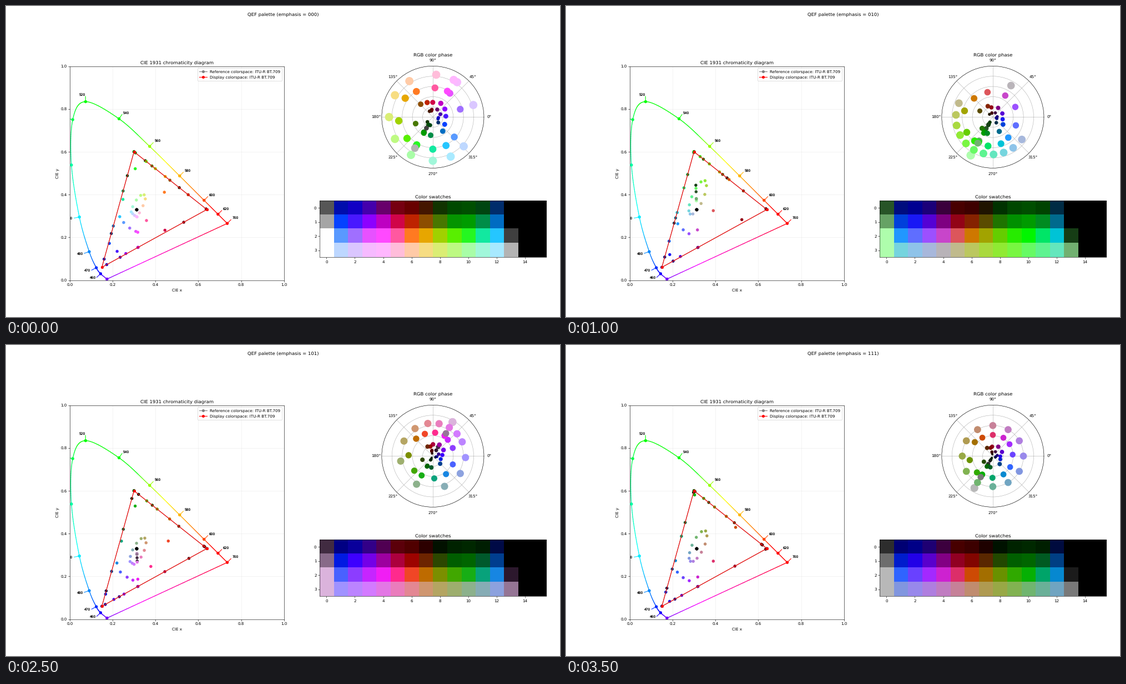
Recreate the animation shown at these times as a matplotlib script. Size 998 by 561 pixels, loop 4 s.

```python
import numpy as np
import matplotlib.pyplot as plt
from matplotlib.animation import FuncAnimation
from matplotlib.collections import LineCollection

W, H, DPI = 998, 561, 64
S = 52 / DPI  # point sizes are meant for 52 dpi
DOT = dict(s=36 * S ** 2, linewidths=1.5 * S)

for key in ("font.size axes.linewidth axes.titlepad axes.labelpad grid.linewidth "
            "lines.linewidth lines.markersize lines.markeredgewidth patch.linewidth "
            "xtick.major.size xtick.major.width xtick.major.pad "
            "ytick.major.size ytick.major.width ytick.major.pad").split():
    plt.rcParams[key] *= S
plt.rcParams["font.size"] *= 0.98
plt.rcParams["font.family"] = "DejaVu Sans"
plt.rcParams["text.hinting"] = "none"

# Composite signal levels in volts, one per palette row
HIGH = (0.616, 0.840, 1.100, 1.100)
LOW = (0.228, 0.312, 0.552, 0.880)
BLACK, WHITE = 0.312, 1.100
DIMMING = 0.812

RED, GREEN, BLUE = (0.64, 0.33), (0.30, 0.60), (0.15, 0.06)
WHITE_POINT = (0.3127, 0.3290)
GREY_ANGLE = np.radians(240)  # neutral greys carry no hue of their own

# Key points of the spectral locus by wavelength
LOCUS = {
    390: (.174, .005), 460: (.144, .030), 470: (.124, .058), 480: (.091, .133),
    490: (.045, .295), 500: (.008, .538), 510: (.014, .750), 520: (.074, .834),
    540: (.230, .754), 560: (.373, .625), 580: (.513, .487), 600: (.627, .373),
    620: (.692, .308), 700: (.735, .265),
}


def xyz_of(xy):
    xy = np.asarray(xy)
    return np.concatenate([xy, 1 - xy.sum(axis=-1, keepdims=True)], axis=-1)


def rgb_to_xyz():
    """Matrix that maps equal parts of the primaries to the white point."""
    primaries = xyz_of([RED, GREEN, BLUE]).T
    white = xyz_of(WHITE_POINT) / WHITE_POINT[1]
    return primaries * np.linalg.solve(primaries, white)


TO_XYZ = rgb_to_xyz()


def in_phase(hue):
    return (hue + np.arange(12)) % 12 < 6


def signal(row, col, emphasis):
    """Twelve samples of one colour cycle, scaled to black = 0 and white = 1."""
    if col > 13:
        return np.zeros(12)
    is_high = (col == 0) | (in_phase(col) & (col < 13))
    volts = np.where(is_high, HIGH[row], LOW[row])
    dimmed = np.zeros(12, bool)
    for bit, hue in enumerate((12, 4, 8)):
        if emphasis >> bit & 1:
            dimmed |= in_phase(hue)
    return (np.where(dimmed, DIMMING, 1) * volts - BLACK) / (WHITE - BLACK)


def transfer(x):
    x = np.clip(x, 0, None)
    return np.clip(np.where(x < 0.11, 30 * x ** 3, 1.09 * x - 0.082), 0, 1)


def decode(samples):
    angle = np.pi / 6 * (np.arange(12) - 0.5)
    y = samples.mean()
    u = 2 * np.mean(samples * np.cos(angle))
    v = -2 * np.mean(samples * np.sin(angle))
    return transfer(np.array([y + 1.140 * v, y - 0.395 * u - 0.581 * v, y + 2.032 * u]))


def palette(emphasis):
    return np.array([[decode(signal(r, c, emphasis)) for c in range(16)] for r in range(4)])


def chromaticity(rgb):
    xyz = rgb @ TO_XYZ.T
    total = xyz.sum(axis=1, keepdims=True)
    return np.where(total > 1e-6, xyz[:, :2] / np.maximum(total, 1e-6), WHITE_POINT)


def hue_and_luma(rgb):
    luma = rgb @ (0.299, 0.587, 0.114)
    theta = np.arctan2(0.877 * (rgb[:, 0] - luma), 0.492 * (rgb[:, 2] - luma))
    neutral = np.ptp(rgb, axis=1) < 1e-6
    return np.where(neutral, GREY_ANGLE, theta), luma


def xy_color(xy):
    """Brightest displayable colour of each chromaticity."""
    rgb = np.clip(xyz_of(xy) @ np.linalg.inv(TO_XYZ).T, 0, None)
    rgb /= rgb.max(axis=1, keepdims=True)
    return np.where(rgb < 0.0031, 12.92 * rgb, 1.055 * rgb ** (1 / 2.4) - 0.055)


def smooth(points, steps=24):
    """Catmull-Rom curve through the points."""
    p = np.vstack([points[0], points, points[-1]])
    t = np.linspace(0, 1, steps, endpoint=False)[:, None]
    parts = [0.5 * (2 * b + (c - a) * t + (2 * a - 5 * b + 4 * c - d) * t ** 2
                    + (3 * b - a - 3 * c + d) * t ** 3)
             for a, b, c, d in zip(p, p[1:], p[2:], p[3:])]
    return np.vstack(parts + [points[-1:]])


def box(left, top, right, bottom):
    return left / W, 1 - bottom / H, (right - left) / W, (bottom - top) / H


def draw_locus(ax):
    xy = np.array(list(LOCUS.values()))
    colors = xy_color(xy)
    path = np.vstack([smooth(xy), np.linspace(xy[-1], xy[0], 80)])
    segments = np.stack([path[:-1], path[1:]], axis=1)
    ax.add_collection(LineCollection(segments, colors=xy_color(segments.mean(axis=1)),
                                     linewidths=1.7 * S, capstyle="round", zorder=2))
    ax.scatter(*xy.T, c=colors, zorder=3, **DOT)

    pixel = 1 / 386
    tangents = np.gradient(xy, axis=0)
    for wave, here, (tx, ty), color in zip(LOCUS, xy, tangents, colors):
        normal = np.array([-ty, tx]) / np.hypot(tx, ty)
        end = here + normal * 9.5 * pixel
        ax.plot(*zip(here, end), color=color, zorder=2)
        lift = 2.8 if normal[1] > 0.3 else -1.2
        for _ in range(2):  # twice for a heavier look
            ax.text(end[0] + 2.6 * normal[0] * pixel, end[1] + lift * pixel, str(wave),
                    fontsize="small", ha="left" if normal[0] > 0 else "right",
                    va="center", clip_on=True)


fig = plt.figure(figsize=(W / DPI, H / DPI), dpi=DPI, facecolor="white")
title = fig.suptitle("")

# Chromaticity diagram
cie = fig.add_axes(box(114.8, 108.5, 500.8, 494.5))
cie.set(xlim=(0, 1), ylim=(0, 1), xlabel="CIE x", ylabel="CIE y",
        title="CIE 1931 chromaticity diagram")
cie.set_axisbelow(True)
cie.grid(alpha=0.25)
draw_locus(cie)
for color, name in (("gray", "Reference"), ("red", "Display")):
    cie.plot(*zip(RED, GREEN, BLUE, RED), "o-", color=color, zorder=5,
             label=f"{name} colorspace: ITU-R BT.709")
cie.legend(loc="upper right").set_zorder(6)
cie_dots = cie.scatter(np.zeros(64), np.zeros(64), c=np.zeros((64, 3)), zorder=4, **DOT)

# Hue wheel
wheel = fig.add_axes(box(676.8, 108.3, 861, 292.4), projection="polar")
wheel.set_title("RGB color phase")
wheel.set_yticks(np.linspace(0.2, 1, 5), labels=[])
wheel.set_axisbelow(True)
wheel.tick_params(axis="x", pad=10.5 * S - 7)
wheel_dots = wheel.scatter(np.zeros(64), np.zeros(64), c=np.zeros((64, 3)), **DOT)
wheel.set_ylim(0, 1)

# Swatches
grid = fig.add_axes(box(564.6, 351.2, 973.4, 453.4))
grid.set_title("Color swatches")
swatches = grid.imshow(np.zeros((4, 16, 3)), aspect="auto", interpolation="nearest")
grid.set_xticks(range(0, 16, 2))
grid.set_yticks(range(4))


def update(emphasis):
    colors = palette(emphasis)
    flat = colors.reshape(-1, 3)
    title.set_text(f"QEF palette (emphasis = {emphasis:03b})")
    swatches.set_data(colors)

    cie_dots.set_offsets(chromaticity(flat))
    cie_dots.set_facecolor(flat)

    theta, luma = hue_and_luma(flat)
    wheel_dots.set_offsets(np.column_stack([theta, luma]))
    wheel_dots.set_sizes(430 * S ** 2 * luma)
    wheel_dots.set_facecolor(flat)
    return title, swatches, cie_dots, wheel_dots


anim = FuncAnimation(fig, update, frames=8, interval=500, repeat=True, repeat_delay=0)
plt.show()
```
